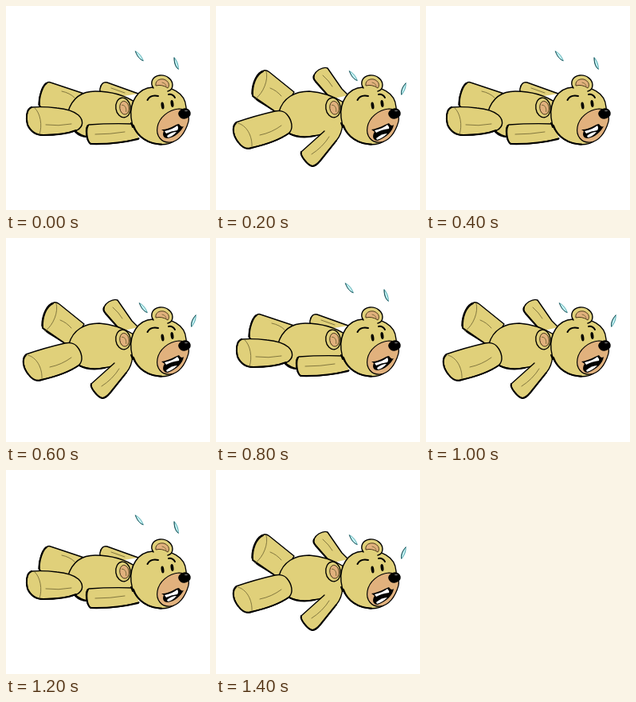
These frames come from a looping animation (256 px wide and 256 px high, 1.6 s). An HTML page:

```html
<!DOCTYPE html>
<html lang="en">
<head>
<meta charset="utf-8">
<title>Kicking teddy bear</title>
<style>
  html, body { margin: 0; width: 100%; height: 100%; overflow: hidden; background: #fff; }
  svg { display: block; width: 100vw; height: 100vh; }
  .fur { fill: #e0d07a; stroke: #000; stroke-width: 1.4; stroke-linejoin: round; stroke-linecap: round; }
  .ink { fill: none; stroke: #000; stroke-width: 2; stroke-linecap: round; stroke-linejoin: round; }
  .fold { fill: none; stroke: #6b6130; stroke-width: .8; stroke-linecap: round; }
  .tan { fill: #e1b17d; stroke: #000; stroke-width: 1.2; stroke-linejoin: round; }
  .inner { fill: #e1b17d; stroke: #3a2a10; stroke-width: .9; }
  .teeth { fill: #fff; }
  .drop { fill: #c4f3f4; stroke: #2a8f98; stroke-width: .7; stroke-linejoin: round; }
  .pose { animation: flip 400ms step-end infinite; }
  .up { visibility: hidden; animation-name: flop; }
  @keyframes flip { 0% { visibility: visible; } 50%, 100% { visibility: hidden; } }
  @keyframes flop { 0% { visibility: hidden; } 50%, 100% { visibility: visible; } }
</style>
</head>
<body>
<svg viewBox="0 0 256 256" role="img" aria-label="A worried teddy bear kicking its limbs">
  <defs>
    <g id="head">
      <path class="fur" d="M157 140C155 121 165 103 184 102C207 99 225 109 226 127C229 146 224 161 214 167C208 173 201 174 194 174C173 172 159 160 157 140Z"/>
      <path class="ink" d="M157 147L159 152L160 150C165 164 178 173 195 173.5"/>
      <path class="fur" d="M185 103C180 96 184 88 193 87C202 86 209 93 209 99C209 103 207 106 203 107"/>
      <path class="inner" d="M188 100C187 94 192 91 198 92C204 94 206 99 203 103Q196 98 188 100Z"/>
      <path class="fold" d="M196 96Q201 97 201 101"/>
      <g transform="rotate(-8 147 127.5)">
        <ellipse class="fur" cx="147" cy="127.5" rx="9.2" ry="12.4"/>
        <ellipse class="inner" cx="148.5" cy="128" rx="5.8" ry="8.4"/>
        <path class="fold" d="M146 124Q152 125 150 133"/>
      </g>
      <path class="tan" d="M217 129C204 130 192 140 190 152C188 163 195 172 206 171C217 170 225 159 229 145C231 135 226 129 217 129Z"/>
      <ellipse cx="196.5" cy="125" rx="1.9" ry="4.5" transform="rotate(-8 196.5 125)"/>
      <ellipse cx="208.5" cy="122.5" rx="1.9" ry="4.5" transform="rotate(-8 208.5 122.5)"/>
      <path class="ink" d="M177.5 118Q181 111 191 113M204 111Q209 110 212 115" stroke-width="1.8"/>
    </g>
    <g id="nose">
      <ellipse cx="224" cy="135" rx="7.8" ry="6.6" transform="rotate(-8 224 135)"/>
      <ellipse cx="226" cy="131.5" rx="2" ry=".8" fill="#777"/>
    </g>
    <g id="sweat">
      <path class="drop" d="M-5 -6C-1 -4 3 0 5 6C1 5 -2 1 -5 -6Z"/>
      <path d="M-5 -6C-3 0 0 4 5 6" fill="none" stroke="#123b40" stroke-width=".8"/>
    </g>
  </defs>

  <g class="pose">
    <use href="#sweat" x="167.3" y="62.7"/>
    <g transform="translate(213.7 72) rotate(20)"><use href="#sweat"/></g>

    <path class="fur" d="M142 114L121 109Q117 108 118 104C119 98 122 95 127 96L166 110"/>
    <path class="fold" d="M132 103L149 109"/>
    <path class="fur" d="M52 96C46 97 41 113 41 124L50 132L84 134L98 110L56 96Q54 95 52 96Z"/>
    <path class="ink" d="M51 97C46 100 41 114 42 125"/>
    <path class="fold" d="M70 107Q80 109 86 115"/>

    <path class="fur" d="M78 132C84 114 97 107 112 107C130 107 148 111 164 122L163 151C145 157 113 166 100 164C83 158 76 146 78 132Z"/>
    <path class="ink" d="M87 158C91 162 97 164 102 164"/>

    <path class="fur" d="M33 127C27 128 25 136 26 145C28 155 36 162 45 162C61 162 78 160 89 156C98 151 97 143 91 137C84 131 75 129 64 128Q47 126 33 127Z"/>
    <path class="ink" d="M32 127C25 130 25 141 27 149C31 158 38 162 47 162Q73 162 88 156"/>
    <path class="fold" d="M36 128C43 134 46 150 42 161M50 149Q66 151 82 148"/>

    <path class="fur" d="M161 148Q131 147 104 149C101 150 100 156 101 163C102 169 104 173 109 173Q142 174 167 166"/>
    <path class="ink" d="M103 150C100 155 101 169 106 173Q136 174 166 167"/>
    <path class="fold" d="M112 161Q131 161 149 158"/>

    <use href="#head"/>
    <path d="M195 155C204 156 211 149 217 148C219 151 221 152 223 151C219 158 212 165 203 166C197 166 196 161 198 157Z"/>
    <path class="teeth" d="M199 157Q209 155 215 150Q217 153 215 156Q207 157 201 160Z"/>
    <path class="teeth" d="M202 163Q208 158 214 158Q209 164 203 165Z"/>
    <use href="#nose"/>
  </g>

  <g class="pose up">
    <use href="#sweat" x="172.3" y="87.5"/>
    <g transform="translate(235.5 104) rotate(60)"><use href="#sweat"/></g>

    <path class="fur" d="M144 117L124 93C121 89 123 84 129 80Q136 76 140 78L158 104L166 112"/>
    <path class="ink" d="M123 87Q121 90 125 95L142 114"/>
    <path class="fold" d="M134 87Q142 94 146 101"/>

    <path class="fur" d="M60 81C51 83 45 97 45 110C46 114 50 117 54 120L74 132L84 131L98 108L67 83Q63 80 60 81Z"/>
    <path class="ink" d="M59 82C50 86 45 100 46 113L72 131"/>
    <path class="fold" d="M63 82C66 92 60 109 49 117M68 103Q76 106 82 113"/>

    <path class="fur" d="M79 133C84 115 99 107 117 107C135 108 149 114 162 122L161 148C148 155 136 162 117 164C100 165 87 160 81 151Q77 143 79 133Z"/>
    <path class="ink" d="M92 160Q105 167 124 163"/>

    <path class="fur" d="M25 146C20 150 21 160 26 168C31 177 38 181 44 178C62 174 80 168 91 160C98 154 95 143 89 136C85 131 80 131 74 132Q48 138 25 146Z"/>
    <path class="ink" d="M25 147C19 153 22 164 28 171C33 178 39 180 45 178Q75 171 91 160"/>
    <path class="fold" d="M27 147C38 149 46 163 45 177M55 162Q70 159 82 150"/>

    <path class="fur" d="M136 157L107 183C105 188 115 200 121 201C125 201 128 198 130 195L151 169Q158 161 159 147"/>
    <path class="ink" d="M107 183C105 187 115 200 121 201Q126 200 131 194L151 169"/>
    <path class="fold" d="M120 186Q134 177 142 164"/>

    <use href="#head"/>
    <path d="M195 155C204 154 211 149 217 147C219 150 221 151 223 149C222 157 214 165 203 169C196 169 196 162 199 158Z"/>
    <path class="teeth" d="M199 156Q209 154 215 149Q218 152 217 154Q208 155 201 159Z"/>
    <path class="teeth" d="M201 166Q208 160 215 160Q209 166 202 168Z"/>
    <use href="#nose"/>
  </g>
</svg>
</body>
</html>
```
